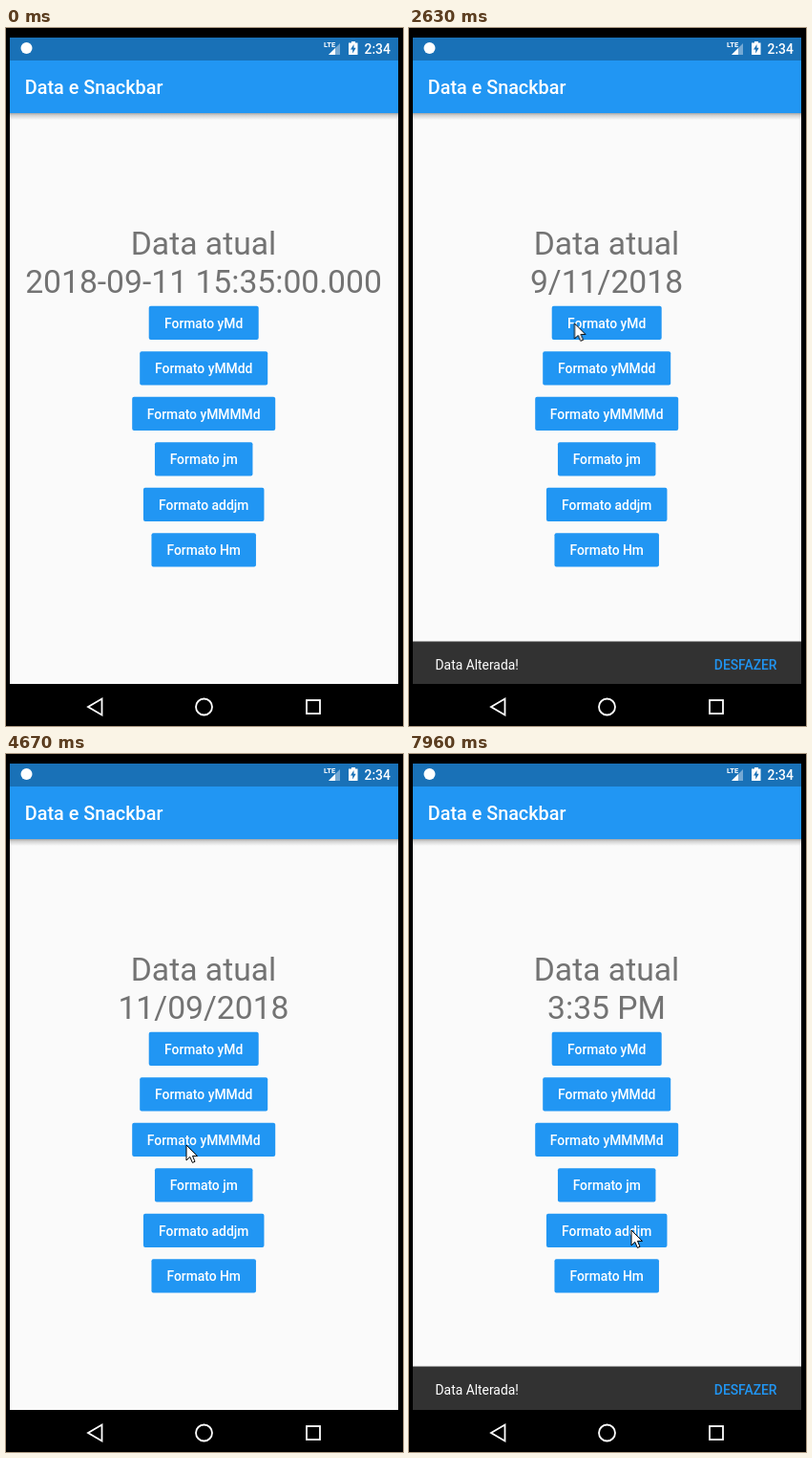
Write an HTML page that moves like this. It is 416x730 px and loops after 8 s.

```html
<!DOCTYPE html>
<html lang="pt">
<head>
<meta charset="utf-8">
<title>Data e Snackbar</title>
<style>
  html, body { margin: 0; width: 100%; height: 100%; overflow: hidden; background: #000; }
  svg { display: block; width: 416px; height: 730px; font: 13.86px Roboto, sans-serif; }
  .medium { font-weight: 500; }
  .heading { font-size: 33.66px; fill: #737373; }
  .middle { text-anchor: middle; }
  .light { fill: #fff; }
  .blue { fill: #2196f3; }
  .nav { fill: none; stroke: #fff; stroke-width: 1.8; }
</style>
</head>
<body>
<svg viewBox="0 0 416 730">
  <defs>
    <linearGradient id="shade" x2="0" y2="1">
      <stop stop-color="#929292"/>
      <stop offset=".4" stop-color="#d0d0d0"/>
      <stop offset="1" stop-color="#fafafa"/>
    </linearGradient>
  </defs>
  <rect width="416" height="730"/>
  <rect x="4" y="10" width="407" height="676" fill="#fafafa"/>
  <rect x="4" y="88" width="407" height="8" fill="url(#shade)"/>
  <rect class="blue" x="4" y="34" width="407" height="55"/>
  <rect x="4" y="10" width="407" height="24" fill="#1971b7"/>

  <g class="light">
    <circle cx="21.5" cy="21" r="6"/>
    <text x="333" y="20" font-size="7.5" font-weight="700">LTE</text>
    <path d="M350 16V28H338Z" opacity=".4"/>
    <path d="M345 21V28H338Z"/>
    <path d="M362 14h4v1.5h2.500v12.500h-9.500v-12.500h3z"/>
    <path d="M364.500 17l-3.500 5.500h2.200v4l3.500-5.700h-2.200z" fill="#1971b7"/>
    <text class="medium" x="375.500" y="27">2:34</text>
    <text class="medium" x="19.800" y="68.500" font-size="19.8">Data e Snackbar</text>
  </g>

  <text class="heading middle" x="207" y="237">Data atual</text>
  <g id="dates"></g>
  <g id="buttons"></g>

  <g id="snack">
    <rect x="4" y="638.500" width="407" height="48" fill="#323232"/>
    <g id="message">
      <text class="light" x="27.500" y="668">Data Alterada!</text>
      <text class="medium blue" x="385.500" y="668" text-anchor="end">DESFAZER</text>
    </g>
  </g>

  <rect y="686" width="416" height="44"/>
  <g class="nav">
    <path d="M86 710L100.500 701.500V718.500Z"/>
    <circle cx="207.500" cy="710" r="8.500"/>
    <rect x="315" y="703" width="14" height="14"/>
  </g>

  <path id="cursor" d="M0 0V16L3.800 12.400 6.400 18.400 9 17.300 6.500 11.400H11.500Z" fill="#fff" stroke="#000"/>
</svg>
<script>
  const LOOP = 8000;
  const TAPS = [1805, 3590, 5375, 7160];
  const DATES = ['2018-09-11 15:35:00.000', '9/11/2018', '11/09/2018', 'September 11, 2018', '3:35 PM'];
  const BUTTONS = [['yMd', 115], ['yMMdd', 134], ['yMMMMd', 150], ['jm', 102.5], ['addjm', 126.5], ['Hm', 109.5]];
  const ENTER = 'cubic-bezier(.4,0,.2,1)';
  const LEAVE = 'cubic-bezier(.8,0,.6,1)';
  const $ = id => document.getElementById(id);

  function add(parent, tag, attrs, text = '') {
    const node = document.createElementNS('http://www.w3.org/2000/svg', tag);
    for (const key in attrs) node.setAttribute(key, attrs[key]);
    node.textContent = text;
    return parent.appendChild(node);
  }

  // Each step is [time in ms, value, easing towards the next step].
  function loop(node, property, steps) {
    const frames = steps.map(([time, value, easing = 'linear']) =>
      ({ offset: time / LOOP, [property]: value, easing }));
    node.animate(frames, { duration: LOOP, iterations: Infinity }).startTime = 0;
  }

  DATES.forEach((date, i) => {
    const node = add($('dates'), 'text', { class: 'heading middle', x: 207, y: 276.5 }, date);
    const steps = [[0, i ? 0 : 1, 'step-end']];
    if (i) steps.push([TAPS[i - 1], 1, 'step-end']);
    if (i < TAPS.length) steps.push([TAPS[i], 0, 'step-end']);
    steps.push([LOOP, i < TAPS.length ? 0 : 1]);
    loop(node, 'opacity', steps);
  });

  BUTTONS.forEach(([name, width], i) => {
    const y = 290.7 + 47.5 * i;
    const box = { x: 207.2 - width / 2, y, width, height: 35.4, rx: 2 };
    add($('buttons'), 'rect', { ...box, class: 'blue' });
    if (i < TAPS.length) {
      const glow = add($('buttons'), 'rect', { ...box, fill: '#bcbcbc', opacity: 0 });
      const tap = TAPS[i];
      loop(glow, 'opacity', [[0, 0], [tap - 240, 0], [tap - 150, .4], [tap, .4], [tap + 200, 0], [LOOP, 0]]);
    }
    add($('buttons'), 'text', { class: 'medium light middle', x: 207.2, y: y + 23 }, 'Formato ' + name);
  });

  const down = px => `translateY(${px}px)`;
  const slide = [[0, down(48)]];
  const fade = [[0, 0]];
  for (const tap of TAPS) {
    const leave = tap + 750;
    slide.push([tap, down(48), ENTER], [tap + 250, down(0)]);
    fade.push([tap, 0, 'step-end'], [tap + 180, 0], [tap + 250, 1]);
    if (leave + 250 < LOOP) {
      slide.push([leave, down(0), LEAVE], [leave + 250, down(48)]);
      fade.push([leave + 250, 1, 'step-end']);
    } else {
      slide.push([leave, down(0), 'ease-in'], [LOOP, down(5)]);
      fade.push([LOOP, 1]);
    }
  }
  loop($('snack'), 'transform', slide);
  loop($('message'), 'opacity', fade);

  const PATH = [
    [0, 420, 400], [450, 420, 400], [850, 200, 314], [1250, 173.5, 309],
    [2750, 173.5, 309], [3200, 174.5, 349], [4120, 174.5, 349], [4600, 189, 409],
    [5800, 189, 409], [6040, 212.5, 423], [6400, 218, 451],
    [7300, 218, 451], [7800, 233, 498], [LOOP, 233, 498]
  ];
  loop($('cursor'), 'transform', PATH.map(([time, x, y]) => [time, `translate(${x}px, ${y}px)`, 'ease-in-out']));
</script>
</body>
</html>
```
